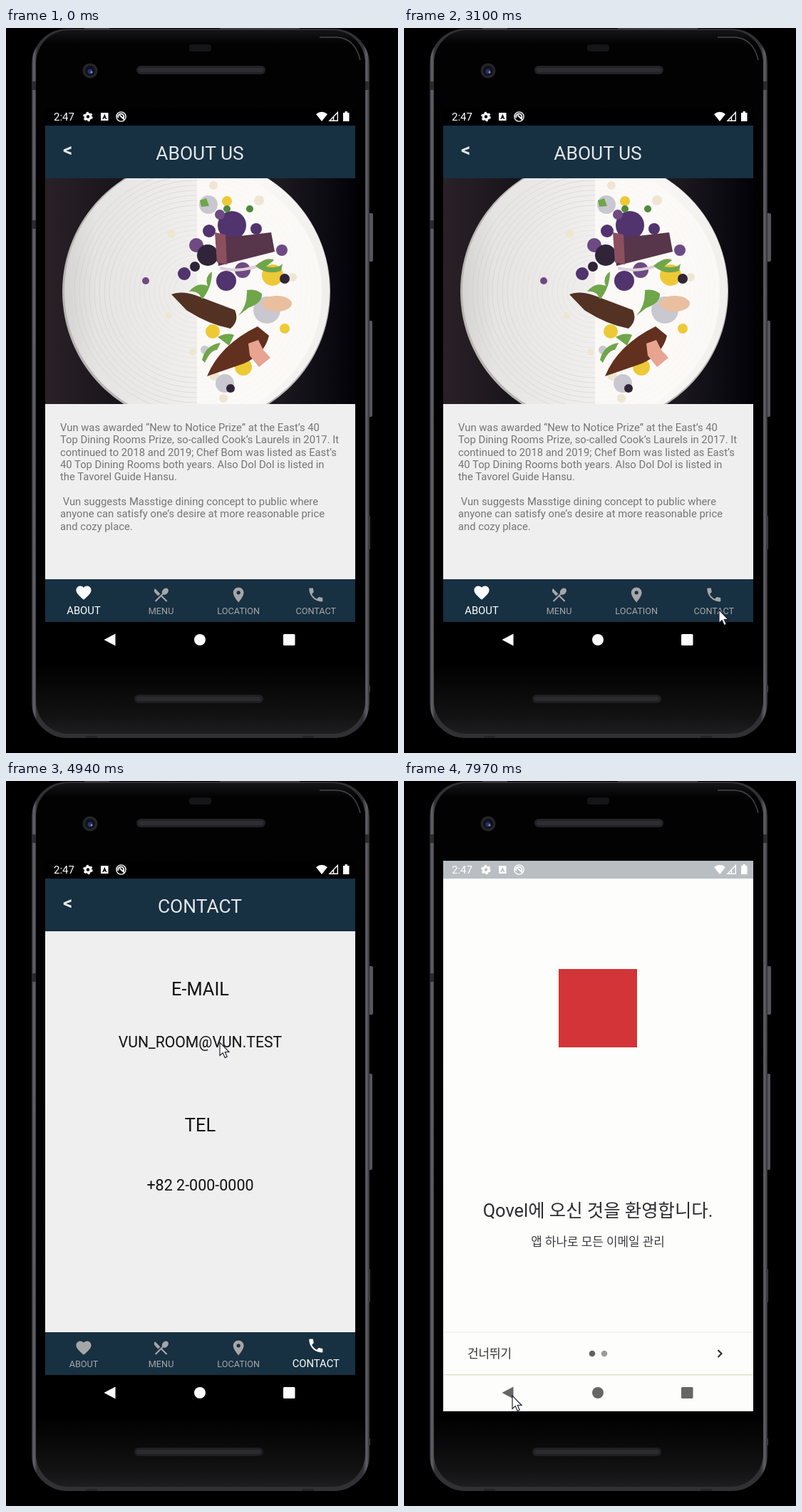
Write an HTML page that moves like this. It is 550 px wide and 1018 px high and loops after 8 s.

```html
<!DOCTYPE html>
<html lang="en">
<head>
<meta charset="utf-8">
<title>Restaurant app</title>
<style>
html, body { margin: 0; width: 100%; height: 100%; overflow: hidden; background: #000; }
svg { display: block; width: 550px; height: 1018px; font-family: Roboto, "Noto Sans CJK KR", "Noto Sans CJK", sans-serif; }
text { white-space: pre; }
.mid { text-anchor: middle; }
</style>
</head>
<body>
<svg id="stage" viewBox="0 0 550 1018" xmlns="http://www.w3.org/2000/svg"></svg>
<script>
const LOOP = 8000;
const CONTACT_AT = 3330, SPLASH_AT = 5000, WELCOME_AT = 5830;

const rect = (x, y, w, h, fill, r = 0) =>
  `<rect x="${x}" y="${y}" width="${w}" height="${h}" rx="${r}" fill="${fill}"/>`;
const dot = (x, y, r, fill) => `<circle cx="${x}" cy="${y}" r="${r}" fill="${fill}"/>`;
const text = (x, y, size, fill, str, extra = 'class="mid"') =>
  `<text x="${x}" y="${y}" font-size="${size}" fill="${fill}" ${extra}>${str}</text>`;

const defs = `<defs>
  <linearGradient id="metal">
    <stop offset="0" stop-color="#24242a"/><stop offset=".006" stop-color="#66666c"/>
    <stop offset=".016" stop-color="#303035"/><stop offset=".98" stop-color="#303035"/>
    <stop offset=".992" stop-color="#606066"/><stop offset="1" stop-color="#2c2c32"/>
  </linearGradient>
  <linearGradient id="glass" x2="0" y2="1">
    <stop offset="0" stop-color="#151518"/><stop offset=".02" stop-color="#020203"/>
    <stop offset=".9" stop-color="#000"/><stop offset=".975" stop-color="#121213"/>
    <stop offset="1" stop-color="#1e1e20"/>
  </linearGradient>
  <linearGradient id="table">
    <stop offset="0" stop-color="#2a2127"/><stop offset=".25" stop-color="#17131a"/>
    <stop offset=".75" stop-color="#1c1a20"/><stop offset="1" stop-color="#020208"/>
  </linearGradient>
  <linearGradient id="plate">
    <stop offset="0" stop-color="#d6d4d3"/><stop offset=".12" stop-color="#e6e4e3"/>
    <stop offset=".5" stop-color="#f1efee"/><stop offset=".7" stop-color="#fbf9f7"/>
    <stop offset="1" stop-color="#f1efec"/>
  </linearGradient>
  <clipPath id="photo"><rect x="55" y="211" width="435" height="317"/></clipPath>
  <clipPath id="screen"><rect x="55" y="112" width="435" height="773"/></clipPath>
</defs>`;

function phone() {
  let s = rect(508, 260, 7, 68, '#55555a', 2) + rect(508, 411, 6, 135, '#55555a', 2) +
    rect(508, 685, 3, 47, '#3c3c40', 1) + rect(508, 923, 3, 10, '#3c3c40', 1);
  s += rect(36, 1, 474, 996, 'url(#metal)', 50);
  for (const [x, y] of [[36, 75], [36, 270], [503, 75]]) s += rect(x, y, 7, 12, '#29292e');
  s += rect(110, 0, 35, 2, '#3a3a3e') + rect(300, 0, 112, 2, '#3a3a3e');
  s += rect(112, 994, 16, 3, '#252527') + rect(416, 994, 16, 3, '#252527');
  s += rect(42, 3, 462, 988, 'url(#glass)', 46);
  s += `<path d="M440 13H465Q490 15 497 45" fill="none" stroke="#77777c" stroke-width="1.5" opacity=".55"/>`;
  s += rect(257, 23, 31, 10, '#151517', 4) + rect(183, 53, 181, 12, '#222226', 6) +
    rect(186, 56, 175, 6, '#2e2e32', 3);
  s += dot(118, 60, 10.5, '#252529') + dot(118, 60, 7, '#111119') + dot(118, 61, 3.5, '#2a316c') + dot(120, 62, 1.5, '#8290c8');
  return s + rect(180, 936, 181, 12, '#1f1f22', 6) + rect(183, 939, 175, 6, '#2b2b2e', 3);
}

function dish() {
  let s = rect(55, 211, 435, 317, 'url(#table)') + dot(267, 370, 188, '#b9b5b4') +
    dot(268, 369, 186, 'url(#plate)');
  for (let r = 30; r < 172; r += 7)
    s += `<circle cx="266" cy="370" r="${r}" fill="none" stroke="#c9c5c6" opacity="${r < 120 ? .25 : .45}"/>`;
  s += `<path d="M268 211H340Q443 270 443 370T350 528H268Z" fill="#fdfbf8" opacity=".85"/>`;
  const groups = {
    '#efe6d2': [291, 221, 6, 232, 289, 6, 228, 404, 5, 305, 520, 6, 262, 455, 5, 355, 242, 7, 402, 350, 6, 292, 488, 7],
    '#c9c7d0': [284, 248, 13, 366, 396, 19, 307, 499, 13, 279, 452, 6],
    '#edc936': [310, 243, 7, 374, 347, 15, 290, 426, 10, 333, 476, 12, 391, 422, 7],
    '#51336d': [317, 277, 20, 285, 285, 9, 309, 355, 14, 250, 345, 9, 351, 282, 8],
    '#6d4a82': [267, 305, 10, 387, 312, 8, 196, 355, 5, 332, 340, 11, 300, 262, 7],
    '#302438': [283, 319, 15, 391, 352, 7, 315, 506, 6, 265, 335, 7],
  };
  for (const [fill, v] of Object.entries(groups))
    for (let i = 0; i < v.length; i += 3) s += dot(v[i], v[i + 1], v[i + 2], fill);
  s += `<path d="M294 296L372 287L377 314L298 334Z" fill="#57354a"/>
    <path d="M293 287L308 290L310 332L296 329Z" fill="#8c4f60"/>
    <path d="M232 374Q248 367 276 379L321 396Q328 411 315 422Q284 416 253 396Z" fill="#533223"/>
    <path d="M282 489Q300 445 353 419L369 432Q363 458 334 471Z" fill="#62301e"/>
    <path d="M300 337Q335 346 375 325" fill="none" stroke="#ddd0d8" stroke-width="4"/>
    <ellipse cx="380" cy="387" rx="21" ry="11" fill="#e9bf9f"/>
    <path d="M340 443L354 438L361 452L371 463L355 476L342 460Z" fill="#e8a391"/>
    <path d="M257 370Q268 356 283 362Q278 350 289 342Q289 365 275 381Q270 368 257 370Z
      M326 404Q339 390 338 368Q350 366 359 373Q360 386 340 393Z
      M350 334Q366 320 376 326L365 335Q382 338 388 331L386 341Q366 348 350 334Z
      M275 466Q280 445 301 442L296 452Q287 452 279 470ZM297 434Q310 427 320 431L313 446Z
      M272 242L281 239L285 250L274 251Z" fill="#6fa64a"/>` +
    dot(310, 254, 5, '#4f8a3b') + dot(342, 254, 5, '#4f8a3b');
  return `<g clip-path="url(#photo)">${s}</g>`;
}

const about = [
  'Vun was awarded “New to Notice Prize” at the East’s 40',
  'Top Dining Rooms Prize, so-called Cook’s Laurels in 2017. It',
  'continued to 2018 and 2019; Chef Bom was listed as East’s',
  '40 Top Dining Rooms both years. Also Dol Dol is listed in',
  'the Tavorel Guide Hansu.', '',
  ' Vun suggests Masstige dining concept to public where',
  'anyone can satisfy one’s desire at more reasonable price',
  'and cozy place.',
].map((line, i) => text(76, 566 + i * 17.33, 14.8, '#757575', line, 'xml:space="preserve"')).join('');

const contact = text(272.5, 301, 25.4, '#111', 'E-MAIL') + text(272.5, 374, 21.2, '#111', 'VUN_ROOM@VUN.TEST') +
  text(272.5, 492, 25.4, '#111', 'TEL') + text(272.5, 575, 21.5, '#111', '+82 2-000-0000');

const tabs = [
  ['ABOUT', 'M12 21.35l-1.45-1.32C5.4 15.36 2 12.28 2 8.5 2 5.42 4.42 3 7.5 3c1.74 0 3.41.81 4.5 2.09C13.09 3.81 14.76 3 16.5 3 19.58 3 22 5.42 22 8.5c0 3.78-3.4 6.86-8.55 11.54z'],
  ['MENU', 'M8.1 13.34l2.83-2.83L3.91 3.5c-1.56 1.56-1.56 4.09 0 5.66zm6.78-1.81c1.53.71 3.68.21 5.27-1.38 1.91-1.91 2.28-4.65.81-6.12-1.46-1.46-4.2-1.1-6.12.81-1.59 1.59-2.09 3.74-1.38 5.27L3.7 19.87l1.41 1.41L12 14.41l6.88 6.88 1.41-1.41L13.41 13z'],
  ['LOCATION', 'M12 2C8.13 2 5 5.13 5 9c0 5.25 7 13 7 13s7-7.75 7-13c0-3.87-3.13-7-7-7zm0 9.5a2.5 2.5 0 1 1 0-5 2.5 2.5 0 0 1 0 5z'],
  ['CONTACT', 'M6.62 10.79c1.44 2.83 3.76 5.14 6.59 6.59l2.2-2.2c.27-.27.67-.36 1.02-.24 1.12.37 2.33.57 3.57.57.55 0 1 .45 1 1V20c0 .55-.45 1-1 1-9.39 0-17-7.61-17-17 0-.55.45-1 1-1h3.5c.55 0 1 .45 1 1 0 1.25.2 2.45.57 3.57.11.35.03.74-.25 1.02z'],
].map(([label, d], i) => {
  const x = 109 + i * 108.6;
  return `<g class="tab"><path transform="translate(${x - 12.7} 783.3) scale(1.057)" d="${d}"/>
    <text class="mid" x="${x}" y="823">${label}</text></g>`;
}).join('');

const status = `<g id="status" fill="currentColor">
  ${text(67, 130, 15, 'currentColor', '2:47', '')}
  <circle cx="115" cy="124.5" r="3.8" fill="none" stroke="currentColor" stroke-width="3.2"/>
  <circle cx="115" cy="124.5" r="5.8" fill="none" stroke="currentColor" stroke-width="2" stroke-dasharray="3.04"/>
  <path fill-rule="evenodd" d="M133 119h10.500v11h-10.500zM138.200 121l-3 7h1.500l.6-1.500h2l.6 1.500h1.500l-3-7z"/>
  <g fill="none" stroke="currentColor" stroke-width="1.4"><circle cx="161.500" cy="124.500" r="6.600"/>
  <path d="M157.500 126a4 4 0 1 1 6.500 1.500M159.500 122.500l7 6.500" stroke-width="1.800"/></g>
  <path d="M435 121Q443 114.500 451 121L443 131Z"/>
  <path d="M454 130.200H465.300V118.500ZM459.500 124.500V130" fill="none" stroke="currentColor" stroke-width="1.400"/>
  <path d="M473 119h2.500v-2h3.500v2h2.500v12h-8.500z"/></g>`;

const sysNav = `<g id="sysnav" fill="currentColor"><path d="M137.500 859L153.500 850.500V867.500Z"/>
  <circle cx="272" cy="859" r="8"/><rect x="389" y="851" width="16.500" height="16" rx="1.500"/></g>`;

const welcome = rect(55, 112, 435, 25, '#b9bec2') + rect(217, 264, 110, 110, '#d23438') +
  text(272, 612, 25.4, '#2b2b30', 'Qovel에 오신 것을 환영합니다.') +
  text(272, 653, 16.9, '#3c3c40', '앱 하나로 모든 이메일 관리') + rect(55, 773.5, 435, 1, '#e8e8e4') +
  text(89, 810, 16.9, '#333', '건너뛰기', '') + dot(264, 804, 4.3, '#616161') + dot(281, 804, 4.3, '#9c9c9c') +
  '<path d="M440.500 799L445.500 804L440.500 809" fill="none" stroke="#333" stroke-width="2.200"/>';

const stage = document.getElementById('stage');
stage.innerHTML = defs + phone() + `<g clip-path="url(#screen)">
  ${rect(55, 112, 435, 773, '#000') + rect(55, 211, 435, 563, '#efefef')}
  <g id="about">${dish() + about}</g><g id="contact">${contact}</g>
  ${rect(55, 137, 435, 74, '#173042') + rect(55, 774, 435, 60, '#173042')}
  ${text(86.5, 180, 26, '#e4e6e8', '&lt;', 'class="mid" font-weight="700"')}
  <text id="title" class="mid" x="272" y="184.500" font-size="26.400" fill="#e4e6e8"></text>${tabs}
  <g id="splash">${rect(55, 112, 435, 773, '#fdfdfc')}<g id="welcome">${welcome}</g>${rect(55, 833, 435, 1.5, '#e1e3c8')}</g>
  ${status + sysNav}</g>
  <path id="cursor" d="M0 0V18.500L4.200 14.600L7.200 21.500L10.200 20.200L7.300 13.500H13Z" fill="#fff" stroke="#15152a" stroke-width="1.100"/>`;

const $ = id => document.getElementById(id);
const show = (id, on) => $(id).setAttribute('visibility', on ? 'visible' : 'hidden');
const clamp = v => Math.max(0, Math.min(1, v));
const ease = v => v * v * (3 - 2 * v);
const tabEls = [...document.querySelectorAll('.tab')];

// time, x, y of the pointer tip
const track = [
  [1870, 161, 79], [2030, 190, -30], [2499, 560, 640], [3100, 442, 817], [3480, 442, 817],
  [4080, 300, 367], [6150, 300, 367], [6670, 354, 760], [7420, 354, 760], [7960, 152, 863], [LOOP, 152, 863],
];

function moveCursor(t) {
  const i = track.findIndex(k => k[0] > t);
  const on = i > 0 && !(t >= 2030 && t < 2500);
  show('cursor', on);
  if (!on) return;
  const [a, b] = [track[i - 1], track[i]];
  const p = ease((t - a[0]) / (b[0] - a[0]));
  const at = n => a[n] + (b[n] - a[n]) * p;
  $('cursor').setAttribute('transform', `translate(${at(1)} ${at(2)})`);
}

function setTab(el, p) {
  const [icon, label] = el.children;
  const c = Math.round(166 + 89 * p);
  el.setAttribute('fill', `rgb(${c},${c},${c})`);
  icon.style.translate = `0 ${-3 * p}px`;
  label.setAttribute('font-size', 12.7 + 2.1 * p);
}

function draw() {
  const t = performance.now() % LOOP;
  const onContact = t >= CONTACT_AT, onSplash = t >= SPLASH_AT, onWelcome = t >= WELCOME_AT;
  show('about', !onContact);
  show('contact', onContact);
  $('title').textContent = onContact ? 'CONTACT' : 'ABOUT US';
  const p = ease(clamp((t - CONTACT_AT) / 115));
  tabEls.forEach((el, i) => setTab(el, i === 0 ? 1 - p : i === 3 ? p : 0));

  const open = ease(clamp((t - SPLASH_AT) / 200));
  show('splash', onSplash);
  show('welcome', onWelcome);
  $('splash').setAttribute('opacity', open);
  $('splash').setAttribute('transform', `translate(0 ${40 * (1 - open)})`);
  $('status').style.color = onSplash && !onWelcome ? '#6c6c6c' : '#fff';
  $('sysnav').style.color = onSplash ? '#666' : '#fff';
  moveCursor(t);
  requestAnimationFrame(draw);
}
draw();
</script>
</body>
</html>
```
